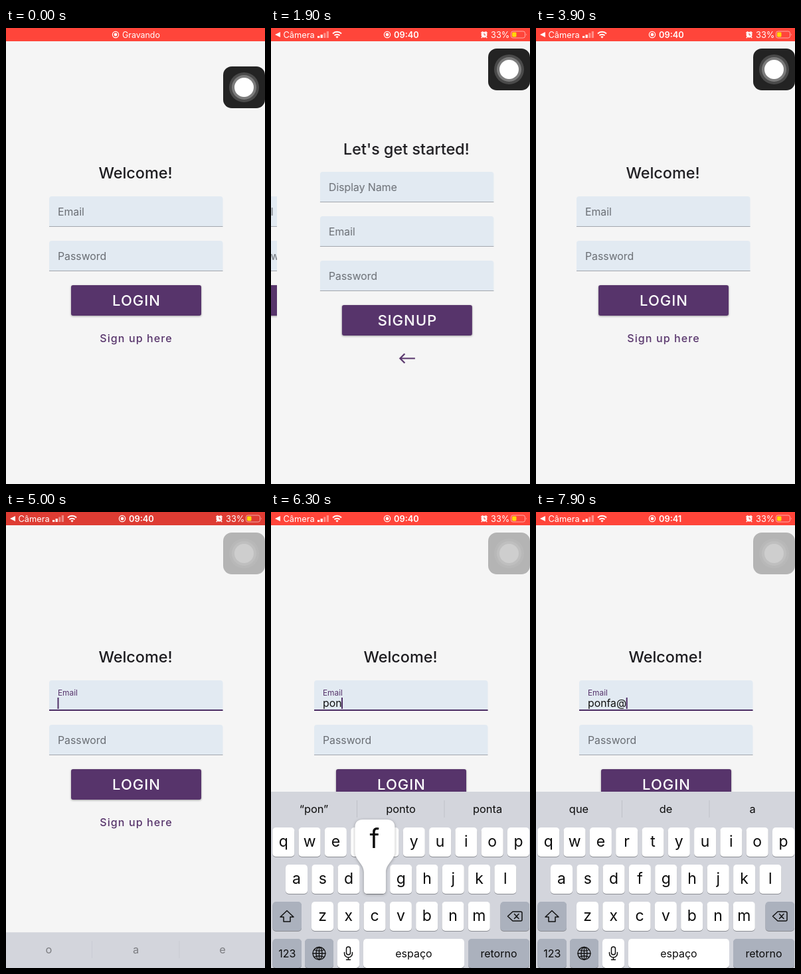
Write an HTML page that moves like this. It is 390x688 px and loops after 8 s.

```html
<!DOCTYPE html>
<html lang="en">
<head>
<meta charset="utf-8">
<title>Login and signup</title>
<style>
html, body { margin: 0; width: 100%; height: 100%; overflow: hidden; background: #f5f5f5; }
svg { display: block; width: 100%; height: 100%; font-family: Inter, Roboto, sans-serif; }
.mid { text-anchor: middle; }
.title { font-size: 23.4px; font-weight: 500; fill: #1c1b1f; }
.hint { font-size: 15.8px; fill: #696d73; }
.btn { font-size: 22px; font-weight: 500; letter-spacing: 1px; fill: #fff; }
.link { font-size: 16px; font-weight: 500; letter-spacing: 1.1px; fill: #57346b; }
.field { fill: #e2eaf2; }
.rule { fill: #a2a6ad; }
.main { fill: #57346b; filter: drop-shadow(0 1px 1.5px rgba(0,0,0,.35)); }
.press { fill: #57346b; opacity: 0; }
.status { font-size: 12.8px; fill: #fff; }
.line { fill: none; stroke: #111; stroke-width: 1.5; stroke-linejoin: round; stroke-linecap: round; }
#keys text, #tips text { fill: #0c0c0c; }
#tips text { font-size: 16.4px; }

/* one loop: 1% = 80 ms */
.a { animation: 8s linear infinite both; }
#bar { animation: pulse 2s ease-in-out infinite; }
@keyframes pulse { 0%, 15%, 85%, 100% { fill: #ff453a } 45%, 70% { fill: #de3c33 } }

#knob { animation-name: lift; }
@keyframes lift {
  0%, 1.25% { transform: translateY(27px); animation-timing-function: ease-out }
  8%, 100% { transform: none }
}
#knobBox { animation-name: boxDim; }
@keyframes boxDim { 0%, 49% { fill: #232323 } 54%, 100% { fill: #b4b4b4 } }
#rings { animation-name: ringDim; }
@keyframes ringDim { 0%, 49% { opacity: 1 } 54%, 100% { opacity: .35 } }

#rec { animation-name: recMove; }
@keyframes recMove {
  0%, 15% { transform: translateX(-10px) }
  17.5% { transform: translateX(-2px) }
  18.75%, 100% { transform: none }
}
#recText { animation-name: recOut; }
@keyframes recOut { 0%, 15% { opacity: 1 } 17.5% { opacity: .25 } 18.5%, 100% { opacity: 0 } }
#clock { animation-name: clockIn; }
@keyframes clockIn {
  0%, 15% { opacity: 0; transform: translateX(-10px) }
  17.5% { opacity: .95; transform: translateX(-2px) }
  18.75%, 100% { opacity: 1; transform: none }
}
#sides { animation-name: sidesIn; }
@keyframes sidesIn { 0%, 18.5% { opacity: 0 } 21.5%, 100% { opacity: 1 } }

#linkPress { animation-name: linkPress; }
@keyframes linkPress { 0%, 15.5% { opacity: 0 } 17%, 19.5% { opacity: .16 } 22%, 100% { opacity: 0 } }
#backPress { animation-name: backPress; }
@keyframes backPress { 0%, 41.8% { opacity: 0 } 43%, 44% { opacity: .16 } 45.4%, 100% { opacity: 0 } }

#login { animation-name: under; }
@keyframes under {
  0%, 19.4% { transform: none; animation-timing-function: cubic-bezier(.25,.75,.2,1) }
  26%, 44.6% { transform: translateX(-117px); animation-timing-function: cubic-bezier(.25,.75,.2,1) }
  51.5%, 100% { transform: none }
}
#signup { animation-name: over; }
@keyframes over {
  0%, 19.4% { transform: translateX(390px); animation-timing-function: cubic-bezier(.25,.75,.2,1) }
  26%, 44.6% { transform: none; animation-timing-function: cubic-bezier(.25,.75,.2,1) }
  51.5%, 100% { transform: translateX(390px) }
}

#label { transform-origin: 78px 283px; animation-name: float; }
@keyframes float {
  0%, 60% { transform: none; fill: #696d73 }
  61.9%, 100% { transform: translateY(-6px) scale(.753); fill: #57346b }
}
#focus { transform-origin: 0 300px; animation-name: focus; }
@keyframes focus { 0%, 60% { transform: scaleY(0) } 61.9%, 100% { transform: none } }

#board { animation-name: rise; }
@keyframes rise {
  0%, 62% { transform: translateY(266px); animation-timing-function: cubic-bezier(.38,.7,.125,1) }
  67.2%, 100% { transform: none }
}
#tips { animation-name: tipsIn; }
@keyframes tipsIn { 0%, 62% { opacity: .35 } 66%, 100% { opacity: 1 } }
</style>
</head>
<body>
<svg viewBox="0 0 390 688">
  <defs>
    <clipPath id="tipClip"><rect x="262" y="422" width="128" height="48"/></clipPath>
    <g id="box">
      <path class="field" d="M65 300V258q0-4 4-4H322.500q4 0 4 4V300Z"/>
      <rect class="rule" x="65" y="299" width="261.500" height="1"/>
    </g>
    <rect id="wide" x="98" width="196" height="46" rx="3"/>
  </defs>
  <rect width="390" height="688" fill="#f5f5f5"/>

  <g id="login" class="a">
    <text class="title mid" x="195" y="227">Welcome!</text>
    <use href="#box"/>
    <use href="#box" y="67"/>
    <rect id="focus" class="a" x="65" y="298" width="261.500" height="2" fill="#4b2c63"/>
    <text id="label" class="hint a" x="78" y="283">Email</text>
    <text id="typed" x="78" y="294" font-size="15.800" fill="#111"></text>
    <rect id="caret" y="280" width="2" height="17" fill="#4f2f66"/>
    <text class="hint" x="78" y="350">Password</text>
    <use href="#wide" class="main" y="388"/>
    <text class="btn mid" x="196.500" y="419">LOGIN</text>
    <use id="linkPress" href="#wide" class="press a" y="445"/>
    <text class="link mid" x="196" y="473.500">Sign up here</text>
  </g>

  <g id="signup" class="a">
    <rect width="390" height="688" fill="#f5f5f5"/>
    <text class="title mid" x="195" y="190.500">Let's get started!</text>
    <use href="#box" y="-37"/>
    <use href="#box" y="30"/>
    <use href="#box" y="97"/>
    <text class="hint" x="78" y="246">Display Name</text>
    <text class="hint" x="78" y="313">Email</text>
    <text class="hint" x="78" y="380">Password</text>
    <use href="#wide" class="main" y="418"/>
    <text class="btn mid" x="196.500" y="449">SIGNUP</text>
    <use id="backPress" href="#wide" class="press a" y="475.500"/>
    <path d="M208 498.500H186M192.500 491.500L185.500 498.500L192.500 505.500" fill="none" stroke="#57346b" stroke-width="2.200"/>
  </g>

  <rect id="bar" width="390" height="20" fill="#ff453a"/>
  <g class="status">
    <g id="rec" class="a">
      <circle cx="175" cy="10" r="4.600" fill="none" stroke="#fff" stroke-width="1.200"/>
      <circle cx="175" cy="10" r="2.400"/>
    </g>
    <text id="recText" class="a" x="175" y="14.500" font-size="12.400">Gravando</text>
    <text id="clock" class="a" x="185" y="14.500" font-weight="600">09:40</text>
    <g id="sides" class="a">
      <path d="M6 10L14 6V14Z"/>
      <text x="18.500" y="14.500">Câmera</text>
      <path d="M70 12h3.200v3H70ZM74.600 10h3.200v5h-3.200Z"/>
      <path d="M79.200 7.500h3.200V15h-3.200ZM83.800 5h3.200v10h-3.200Z" opacity=".4"/>
      <g fill="none" stroke="#fff" stroke-width="2">
        <path d="M93 8.500a9.300 9.300 0 0 1 13 0M95.500 11.300a5.700 5.700 0 0 1 8 0"/>
      </g>
      <path d="M99.500 15.500L97.400 13.300a3 3 0 0 1 4.200 0Z"/>
      <circle cx="321" cy="10.200" r="4.400"/>
      <path d="M316.300 7.800L319 5.200M325.700 7.800L323 5.200M318 13.500L316.800 15M324 13.500L325.200 15" stroke="#fff" stroke-width="1.400"/>
      <path d="M321 7.500V10.500H323.300" fill="none" stroke="#e8463c"/>
      <text x="331" y="14.500">33%</text>
      <rect x="361.500" y="5" width="21" height="10" rx="2.800" fill="none" stroke="#fff" stroke-opacity=".55"/>
      <path d="M384 8.300q1.800 1.700 0 3.400Z" opacity=".55"/>
      <rect x="363" y="6.500" width="6.500" height="7" rx="1.400" fill="#ffd60a"/>
    </g>
  </g>

  <g id="knob" class="a">
    <rect id="knobBox" class="a" x="327" y="31" width="63" height="63" rx="13" fill="#232323"/>
    <g id="rings" class="a" fill="#fff">
      <circle cx="358.500" cy="62.500" r="22.500" opacity=".18"/>
      <circle cx="358.500" cy="62.500" r="18.500" opacity=".28"/>
      <circle cx="358.500" cy="62.500" r="14.500"/>
    </g>
  </g>

  <g id="board" class="a">
    <rect y="422" width="390" height="266" fill="#d3d5dc"/>
    <g id="tips" class="a">
      <path id="seps" d="M129.500 435V461M261 435V461" stroke="#bfc1c9"/>
      <rect id="pick" x="130" y="428.500" width="131" height="39" rx="5" fill="#e9eaef"/>
      <text class="mid" x="64.500" y="454"></text>
      <text class="mid" x="195.500" y="454"></text>
      <g clip-path="url(#tipClip)"><text y="454"></text></g>
    </g>
    <g id="keys"></g>
    <g id="pop" style="filter:drop-shadow(0 1px 2px rgba(0,0,0,.3))">
      <path fill="#fff"/>
      <text class="mid" font-size="40" fill="#0c0c0c"></text>
    </g>
  </g>
</svg>
<script>
const $ = id => document.getElementById(id);
const LOOP = 8000, FOCUS = 4800;
const spots = {};

function key(x, y, w, label = '', size = 16, dark = false) {
  const cx = x + w / 2;
  const dy = size > 20 ? 29 : size < 15 ? 27 : 28;
  spots[label] = { cx, y };
  return `<rect x="${x}" y="${y + 1}" width="${w}" height="44" rx="5" fill="#8b8d93"/>
    <rect x="${x}" y="${y}" width="${w}" height="44" rx="5" fill="${dark ? '#abb1bd' : '#fff'}"/>
    <text class="mid" x="${cx}" y="${y + dy}" font-size="${size}">${label.replace('&', '&amp;')}</text>`;
}

const row = (chars, x, y, w = 33, pitch = 39.3, size = 23) =>
  [...chars].map((c, i) => key(x + i * pitch, y, w, c, size)).join('');

$('keys').innerHTML =
  `<g id="letters">${row('qwertyuiop', 2.3, 476)}${row('asdfghjkl', 22, 532)}${row('zxcvbnm', 61, 588)}
    ${key(2.5, 588, 43.5, '', 16, true)}
    <path class="line" d="M24 601.500L34 611H29V618H19V611H14Z"/></g>
  <g id="symbols">${row('1234567890', 2.3, 476, 33, 39.3, 22)}${row('-/:;()$&@”', 2.3, 532, 33, 39.3, 22)}
    ${row('.,?!’', 61, 588, 49, 55.2)}${key(2.5, 588, 43.5, '#+=', 14, true)}</g>` +
  key(345.500, 588, 43.5, '', 16, true) +
  `<path class="line" d="M364 603H376q2 0 2 2V615q0 2-2 2H364L356.500 610ZM366.500 606.500L373 613.500M373 606.500L366.500 613.500"/>` +
  key(2.5, 644, 43.5, '123', 16, true) + key(51, 644, 43, '', 16, true) +
  `<g class="line" style="stroke-width:1.300"><circle cx="72.500" cy="666" r="9.500"/>
    <ellipse cx="72.500" cy="666" rx="4.500" ry="9.500"/>
    <path d="M63 666H82M72.500 656.500V675.500M65 660.500Q72.500 664 80 660.500M65 671.500Q72.500 668 80 671.500"/></g>` +
  key(100, 644, 33) +
  `<g class="line"><rect x="113.500" y="656" width="6" height="12" rx="3"/>
    <path d="M110.500 664.500v1.500a6 6 0 0 0 12 0V664.500M116.500 672V675.500M113.500 675.500H119.500"/></g>` +
  key(139, 644, 152, 'espaço') + key(297, 644, 92, 'retorno', 16, true);

const modeText = [...$('keys').querySelectorAll('text')].find(e => e.textContent === '123');
const tipTexts = $('tips').querySelectorAll('text');
const [popShape, popText] = $('pop').children;

// time, text in the field, suggestions
const steps = [
  [0, '', ['o', 'a', 'e']],
  [5680, 'p', ['o', 'a', 'e']],
  [5910, 'po', ['“po”', 'por', 'pode']],
  [6130, 'pon', ['“pon”', 'ponto', 'ponta']],
  [6340, 'ponf', ['“ponf”', 'ponto', 'ponte']],
  [6550, 'ponfa', ['“ponfa”', 'Ponfa', 'raunedoume482']],
  [7500, 'ponfa@', ['que', 'de', 'a']],
];

function popup(c) {
  const { cx, y } = spots[c];
  const l = Math.min(329, Math.max(1, cx - 30)), r = l + 60;
  const a = cx - 16.5, b = cx + 16.5, top = y - 68;
  popShape.setAttribute('d', `M${l + 12} ${top}H${r - 12}Q${r} ${top} ${r} ${top + 12}V${y - 20}
    C${r} ${y - 6} ${b} ${y - 2} ${b} ${y + 12}V${y + 39}q0 5-5 5H${a + 5}q-5 0-5-5V${y + 12}
    C${a} ${y - 2} ${l} ${y - 6} ${l} ${y - 20}V${top + 12}Q${l} ${top} ${l + 12} ${top}Z`);
  popText.setAttribute('x', l + 29.5);
  popText.setAttribute('y', y - 25);
  popText.textContent = c;
}

const show = (el, on) => { el.style.display = on ? '' : 'none'; };

// solid for half a second, then fades out and back in
function blink(ms) {
  const p = ms % 1000;
  if (p < 500) return 1;
  return p < 850 ? Math.max(0, 1 - (p - 500) / 250) : (p - 850) / 150;
}

function render(t) {
  const [since, text, tips] = steps.findLast(s => s[0] <= t);
  $('typed').textContent = text;
  $('caret').setAttribute('x', 77.5 + (text ? $('typed').getComputedTextLength() : 0));
  $('caret').style.opacity = t < FOCUS + 100 ? 0 : blink(t - Math.max(since, FOCUS));

  const long = tips[2].length > 10;
  tipTexts.forEach((e, i) => { e.textContent = tips[i]; });
  tipTexts[2].setAttribute('x', long ? 382 : 326);
  tipTexts[2].setAttribute('text-anchor', long ? 'end' : 'middle');
  show($('pick'), long);
  show($('seps'), !long);

  const symbols = t >= 6850 && t < 7700;
  show($('symbols'), symbols);
  show($('letters'), !symbols);
  modeText.textContent = symbols ? 'ABC' : '123';

  const hit = steps.find(([at, s]) => s && t >= at - 70 && t < at + 80);
  show($('pop'), hit);
  if (hit) popup(hit[1].slice(-1));

  $('clock').textContent = t < 7700 ? '09:40' : '09:41';
}

let start;
function tick(now) {
  start ??= now;
  render((now - start) % LOOP);
  requestAnimationFrame(tick);
}
render(0);
requestAnimationFrame(tick);
</script>
</body>
</html>
```
